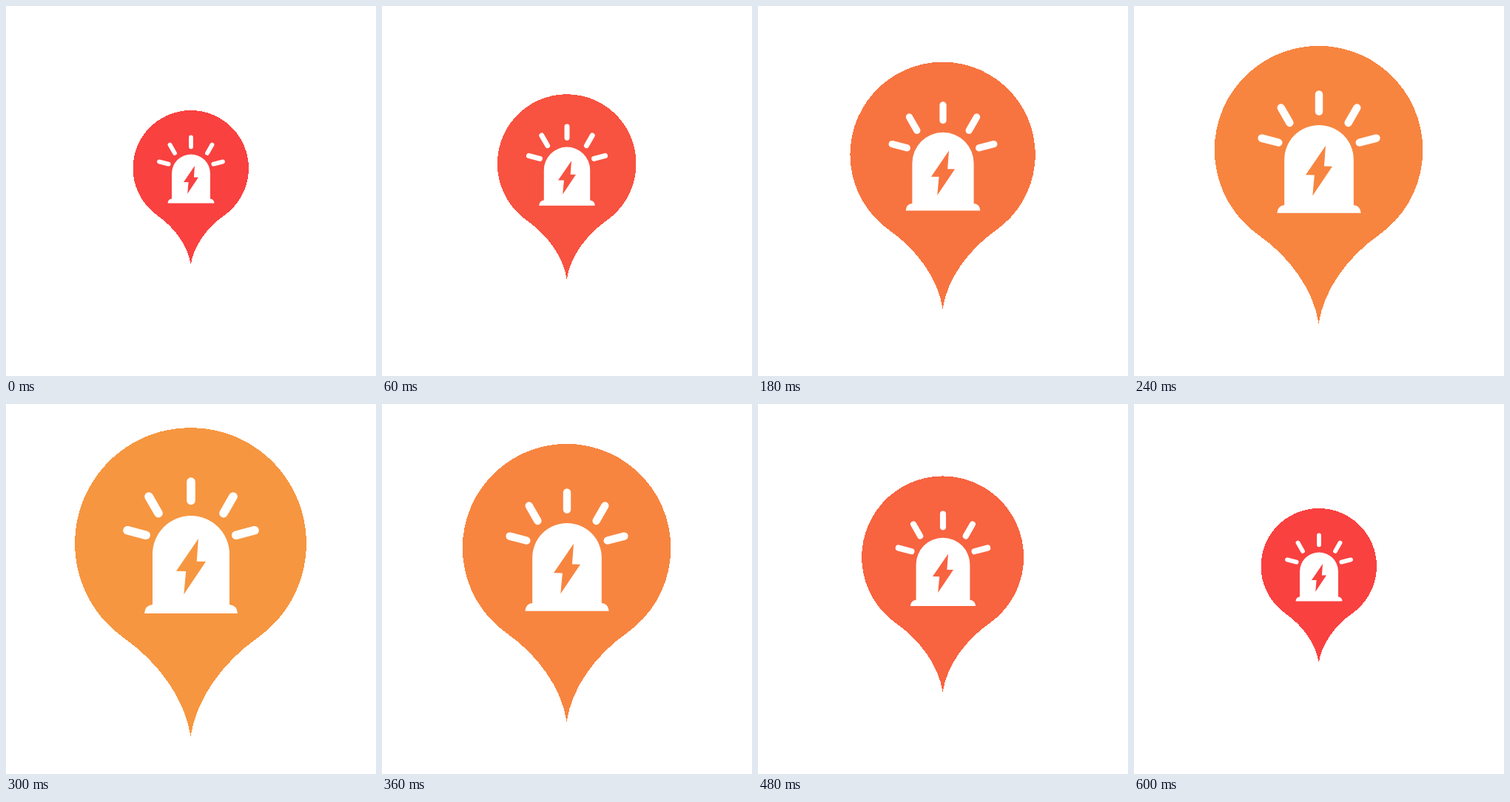
An HTML page that plays this animation: 500x500 px, repeating every 0.63 s.

```html
<!DOCTYPE html>
<html lang="en">
<head>
<meta charset="utf-8">
<title>Pulsing alert pin</title>
<style>
  html, body { margin: 0; width: 100%; height: 100%; overflow: hidden; background: #fff; }
  svg { display: block; width: 100vw; height: 100vh; }
</style>
</head>
<body>
<svg viewBox="0 0 500 500">
  <!-- drawn at full size around the stage centre -->
  <g id="pin">
    <path shape-rendering="crispEdges" fill="currentColor"
      d="M-91 66A156.4 156.4 0 1 1 90 66C44 98 7 148 -.5 199C-8 148 -45 98 -91 66Z"/>
    <path fill="#fff" d="M-63 33Q-62 22 -52 21V-47A52 52 0 0 1 52 -47V21Q62 22 63 33Z"/>
    <path fill="currentColor" d="M10 -68L7.7 -37.2L20 -37L-9.7 7.3L-6.8 -24L-20 -24.2Z"/>
    <path fill="none" stroke="#fff" stroke-width="11.6" stroke-linecap="round"
      d="M0 -145V-119.5M-57 -125L-44 -102.3M57 -125L44 -102.3M-86 -79.3L-60.8 -72.7M86 -79.3L60.8 -72.7"/>
  </g>
</svg>
<script>
  const LOOP = 630, STEP = 30, HALF = 300;
  const LOW = [249, 65, 64], HIGH = [246, 150, 64];
  const pin = document.getElementById('pin');

  const mix = (a, b, k) => a + (b - a) * k;

  function draw(ms) {
    const t = Math.floor((ms % LOOP) / STEP) * STEP;
    const k = 1 - Math.abs(t - HALF) / HALF;
    const rgb = LOW.map((c, i) => Math.round(mix(c, HIGH[i], k)));
    pin.setAttribute('transform', `translate(250 250) scale(${mix(0.5, 1, k)})`);
    pin.setAttribute('color', `rgb(${rgb})`);
  }

  const start = performance.now();
  function tick() {
    draw(performance.now() - start);
    requestAnimationFrame(tick);
  }
  draw(0);
  requestAnimationFrame(tick);
</script>
</body>
</html>
```
